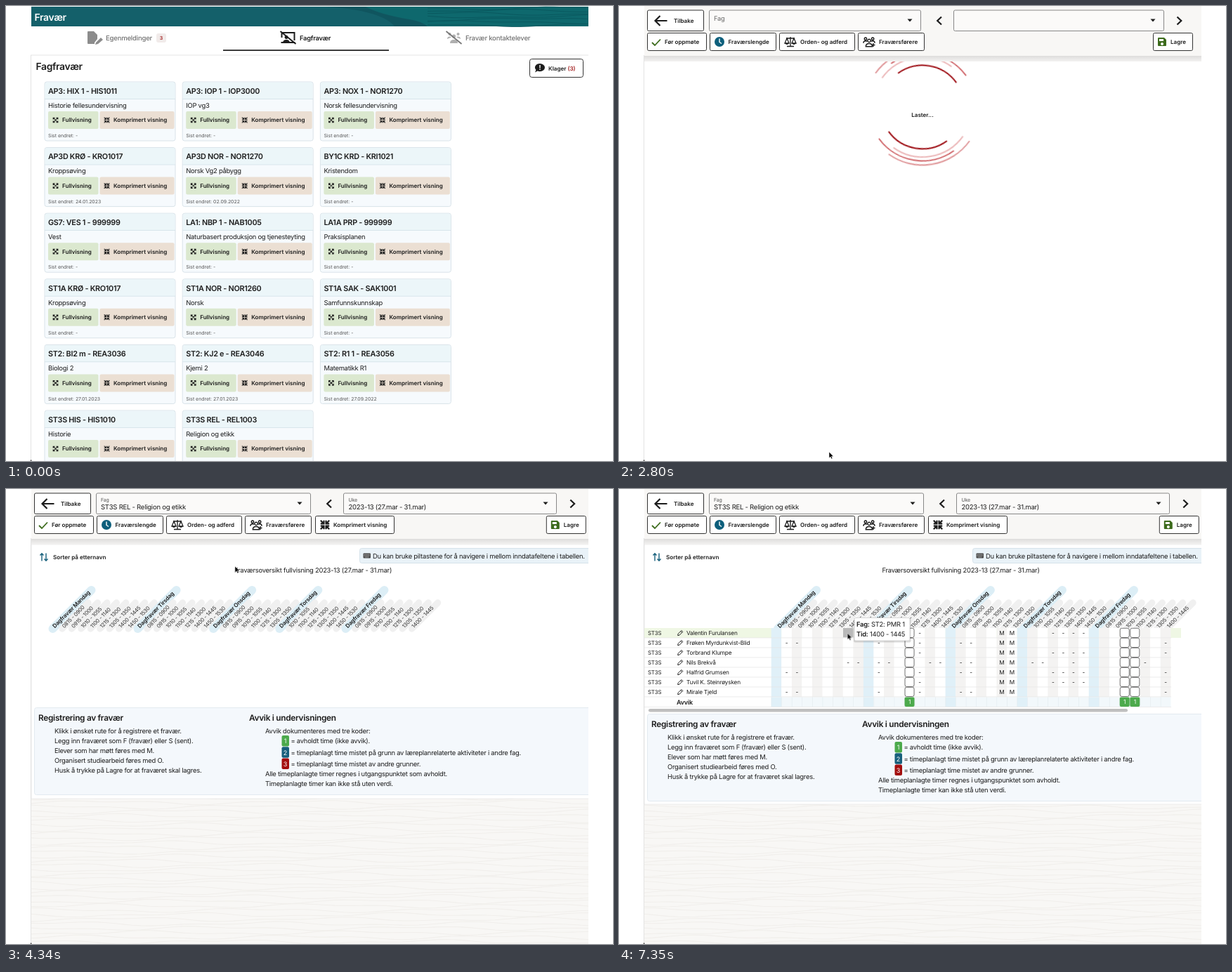
An HTML page that plays this animation: 864x648 px, repeating every 8 s.

```html
<!DOCTYPE html>
<html lang="no">
<head>
<meta charset="utf-8">
<title>Fravær</title>
<style>
html, body { margin: 0; width: 100%; height: 100%; overflow: hidden; background: #fff; }
svg { display: block; width: 100vw; height: 100vh; }
text { font-family: Inter, "Noto Sans", sans-serif; letter-spacing: -.025em; fill: #1c1c1c; white-space: pre; text-rendering: geometricPrecision; }
.b { font-weight: 600; }
.btn { font-weight: 600; letter-spacing: 0; }
.line { fill: none; stroke: #1c1c1c; }

.step { animation: 8s step-end infinite; }
.list { animation-name: list; }
.hover { animation-name: hover; }
.loader { animation-name: loader; }
.empty { animation-name: empty; }
.values { animation-name: values; }
.sheet { animation-name: sheet; }
.sparse { animation-name: sparse; }
.full { animation-name: full; }
.row { animation-name: row; }
.tip { animation-name: tip; }
.arrow { animation-name: arrow; }
@keyframes list { 0% { visibility: visible } 35%, 100% { visibility: hidden } }
@keyframes hover { 0% { visibility: hidden } 25.375% { visibility: visible } 35%, 100% { visibility: hidden } }
@keyframes loader { 0% { visibility: hidden } 35% { visibility: visible } 53.375%, 100% { visibility: hidden } }
@keyframes empty { 0% { visibility: hidden } 35% { visibility: visible } 40%, 100% { visibility: hidden } }
@keyframes values { 0% { visibility: hidden } 40% { visibility: visible } 53.375%, 100% { visibility: hidden } }
@keyframes sheet { 0% { visibility: hidden } 53.375%, 100% { visibility: visible } }
@keyframes sparse { 0% { visibility: hidden } 53.375% { visibility: visible } 55.125%, 100% { visibility: hidden } }
@keyframes full { 0% { visibility: hidden } 55.125%, 100% { visibility: visible } }
@keyframes row { 0% { visibility: hidden } 69.125%, 100% { visibility: visible } }
@keyframes tip { 0% { visibility: hidden } 81.375%, 100% { visibility: visible } }
@keyframes arrow { 0% { visibility: hidden } 35%, 100% { visibility: visible } }

.tint { animation: tint 8s linear infinite; }
@keyframes tint { 0%, 10.5% { opacity: 0 } 25.375%, 100% { opacity: 1 } }
.spin { animation: spin 8s linear infinite; }
@keyframes spin { 0%, 35% { transform: rotate(9deg) } 55%, 100% { transform: rotate(378.5deg) } }
.hand { animation: hand 8s linear infinite; }
@keyframes hand {
  0%, 21% { transform: translate(316px, 660px) }
  25.375%, 34.999% { transform: translate(298.5px, 635.5px) }
  35%, 100% { transform: translate(298px, 700px) }
}
.move { animation: move 8s ease-in-out infinite; }
@keyframes move {
  0%, 35% { transform: translate(299px, 635px) }
  44%, 45.5% { transform: translate(325px, 113px) }
  54.25%, 60.4% { transform: translate(326px, 110px) }
  70.875%, 71.75% { transform: translate(340px, 205.5px) }
  73.5%, 100% { transform: translate(325.3px, 205.5px) }
}
</style>
</head>
<body>
<script>
const range = (n, f) => Array.from({ length: n }, (_, i) => f(i)).join('');
const text = (x, y, s, size = 9.4, o = '') =>
  `<text x="${x}" y="${(y + size * .36).toFixed(2)}" font-size="${size}" ${o}>${s}</text>`;
const bold = (x, y, s, size, o = '') => text(x, y, s, size, 'class="b" ' + o);
const label = (x, y, s, o = '') => text(x, y, s, 8.05, 'class="btn" ' + o);
const box = (x, y, w, h, fill, stroke = 'none', r = 0, o = '') =>
  `<rect x="${x}" y="${y}" width="${w}" height="${h}" rx="${r}" fill="${fill}" stroke="${stroke}" ${o}/>`;
const line = (x, y, d, width = 1.2, scale = 1, o = '') =>
  `<path class="line" transform="translate(${x} ${y}) scale(${scale})" d="${d}" stroke-width="${width}" ${o}/>`;
const solid = (x, y, d, fill = '#1c1c1c', o = '') =>
  `<path transform="translate(${x} ${y})" d="${d}" fill="${fill}" ${o}/>`;
const group = (cls, s, o = '') => `<g class="${cls}" ${o}>${s}</g>`;
const shift = (x, y, s) => `<g transform="translate(${x} ${y})">${s}</g>`;
const wave = (x0, x1, y, amp, k) => {
  let d = '';
  for (let x = x0; x <= x1; x += 12)
    d += (d ? 'L' : 'M') + x + ' ' + (y + amp * (Math.sin(x / 47 + k * 1.9) + .6 * Math.sin(x / 21 + k * k))).toFixed(1);
  return d;
};

const EXPAND = 'M-3.5-1V-3.5H-1M1 3.5H3.5V1M1-3.5H3.5V-1M-1 3.5H-3.5V1M-3.5-3.5L3.5 3.5M3.5-3.5L-3.5 3.5';
const COMPRESS = 'M-1-4V-1H-4M1-4V-1H4M-1 4V1H-4M1 4V1H4M-1-1L-4-4M1-1L4-4M-1 1L-4 4M1 1L4 4';
const PEOPLE = 'M-6-7a2 2 0 1 0 .1 0zM6-7a2 2 0 1 0 .1 0zM0-4.5a2.6 2.6 0 1 0 .1 0zM-9.5 2q0-3.5 3.5-3.5q1.6 0 2.4 1M9.5 2q0-3.5-3.5-3.5q-1.6 0-2.4 1M-5.5 8q0-5 5.5-5t5.5 5z';

// Subject list
const cards = [
  ['AP3: HIX 1 - HIS1011', 'Historie fellesundervisning', '-'],
  ['AP3: IOP 1 - IOP3000', 'IOP vg3', '-'],
  ['AP3: NOX 1 - NOR1270', 'Norsk fellesundervisning', '-'],
  ['AP3D KRØ - KRO1017', 'Kroppsøving', '24.01.2023'],
  ['AP3D NOR - NOR1270', 'Norsk Vg2 påbygg', '02.09.2022'],
  ['BY1C KRD - KRI1021', 'Kristendom', '-'],
  ['GS7: VES 1 - 999999', 'Vest', '-'],
  ['LA1: NBP 1 - NAB1005', 'Naturbasert produksjon og tjenesteyting', '-'],
  ['LA1A PRP - 999999', 'Praksisplanen', '-'],
  ['ST1A KRØ - KRO1017', 'Kroppsøving', '-'],
  ['ST1A NOR - NOR1260', 'Norsk', '-'],
  ['ST1A SAK - SAK1001', 'Samfunnskunnskap', '-'],
  ['ST2: BI2 m - REA3036', 'Biologi 2', '27.01.2023'],
  ['ST2: KJ2 e - REA3046', 'Kjemi 2', '27.01.2023'],
  ['ST2: R1 1 - REA3056', 'Matematikk R1', '27.09.2022'],
  ['ST3S HIS - HIS1010', 'Historie', '-'],
  ['ST3S REL - REL1003', 'Religion og etikk', '-'],
];
const fullButton = fill => box(5, 42, 71.5, 25, fill, 'none', 2) + line(15.5, 54.5, EXPAND, 1.1, .95) + label(25, 54.5, 'Fullvisning');
const card = ([title, subject, date], i) => shift(55 + i % 3 * 196.2, 108 + Math.floor(i / 3) * 93.6,
  box(0, 0, 186, 84, '#f6fafd', '#d9e3e9', 3) +
  box(.5, .5, 185, 24, '#ecf6f9', 'none', 3) + box(0, 24, 186, .8, '#d3e2e8') +
  bold(5, 13, title, 10.8) + text(5, 33.5, subject) +
  fullButton('#dbe8cf') + box(78.5, 42, 106, 25, '#ebdfd3', 'none', 2) +
  line(88.5, 54.5, COMPRESS, 1.2, .95) + label(98, 54.5, 'Komprimert visning') +
  text(5, 76.8, 'Sist endret: ' + date, 6.9, 'style="fill:#555;letter-spacing:0"'));

const list =
  box(36, 1, 793, 28, '#14606a') +
  solid(0, 0, 'M455 1Q535 6 553 29H829V1Z', '#10555f') +
  solid(0, 0, 'M512 1Q532 12 574 19Q592 22 600 29H829V1Z', '#0e686d') +
  range(7, k => `<path d="${wave(600, 829, 3 + k * 4, 1.6, k)}" fill="none" stroke="#0a575e" stroke-width=".9"/>`) +
  bold(40.5, 15.5, 'Fravær', 13.9, 'style="fill:#fff"') +
  solid(116, 36, 'M1 0H9L14 5V11L10 16V18H1Q0 18 0 17V1Q0 0 1 0zM12 16L19 9L22 12L15 18L11 19z', '#8c8c8c') +
  text(142, 45.5, 'Egenmeldinger', 9.6, 'font-weight="500" style="fill:#737373"') +
  box(214, 39, 14, 13, '#f1ebea', 'none', 3) + bold(221, 45.8, '3', 7, 'text-anchor="middle" style="fill:#a01818"') +
  line(401.5, 45, 'M-9 0V-7H9V4M-10 7H10M-11-9L11 9', 2) +
  solid(399, 47, 'M0-5a2.5 2.5 0 1 0 .1 0zM-5 6q0-5 5-5t5 5z') +
  bold(418, 45.5, 'Fagfravær', 9.3) + box(309, 62.2, 236, 1.7, '#1c1c1c') +
  solid(637.5, 45, PEOPLE, '#b0b0b0') + line(637.5, 45, 'M-11-9L11 9', 1.8, 1, 'style="stroke:#777"') +
  text(654, 45.5, 'Fravær kontaktelever', 9.6, 'font-weight="500" style="fill:#737373"') +
  box(36, 70, 793, 578, '#f9f8f6', 'none', 0, 'class="tint"') +
  box(35, 69.6, 794, .8, '#dedede') +
  bold(42.5, 85.5, 'Fagfravær', 13.9) +
  box(745.5, 75.5, 76, 26, '#fff', '#333', 3) +
  solid(760, 88, 'M0-6a7 5.6 0 0 1 0 11.2q-2 0-3.5-.6L-7 6.5L-5.6 3A7 5.6 0 0 1 0-6z') +
  line(760, 88, 'M0-4V.4M0 1.6V3', 1.4, 1, 'style="stroke:#fff"') +
  label(772, 89, 'Klager <tspan style="fill:#a01818">(3)</tspan>') +
  cards.map(card).join('') +
  group('step hover', shift(251.2, 576, box(-.3, -.3, 186.6, 84, 'none', '#b9c6cd', 3) + fullButton('#c7d6c3')));

// Toolbar shared by loading view and sheet; dx follows the widened layout
const button = (x, w, tx, s) => box(x + .5, 38.5, w - 1, 25, '#fff', '#333', 2) + label(tx, 51.5, s);
const select = (x, w) => box(x + .5, 6, w - 1, 29.5, '#fbfaf9', '#888', 2) + solid(x + w - 16, 20.5, 'M-3.5-2H3.5L0 2z');
const toolbar = dx =>
  box(36, 0, 793, 71, '#f8f7f5') + box(36, 71, 793, 8, 'url(#shade)') +
  box(40.5, 6, 80, 29.5, '#fff', '#333', 2) + line(59.5, 21, 'M9 0H-8M-1-7L-8 0L-1 7', 2.2) + label(78, 21, 'Tilbake') +
  select(128, 302 + dx) + select(476 + dx, 300 + dx) +
  line(456 + dx, 21, 'M3-5.5L-2.8 0L3 5.5', 2.2) + line(797.5 + dx * 2.2, 21, 'M-3-5.5L2.8 0L-3 5.5', 2.2) +
  button(40, 85, 65, 'Før oppmøte') + line(53, 51.5, 'M-6 .5L-2 4.5L6-4', 1.8, 1, 'style="stroke:#3c6b1c"') +
  button(129, 95, 155.5, 'Fraværslengde') + `<circle cx="143" cy="51" r="7" fill="#0d5f7c"/>` +
  line(143, 51, 'M0-4.5V.5L3 2.5', 1.4, 1, 'style="stroke:#fff"') +
  button(228, 108, 258, 'Orden- og adferd') +
  line(244, 51, 'M0-7V6.5M-5 6.5H5M-6-5H6M-5-5L-8 2H-2zM5-5L2 2H8z', 1.3) + solid(244, 51, 'M-8 2H-2Q-5 6-8 2zM2 2H8Q5 6 2 2z') +
  button(340, 95, 370, 'Fraværsførere') + line(356, 51, PEOPLE, 1.7, .85) + line(362, 55.5, 'M-2.5 0H2.5M0-2.5V2.5', 1.4) +
  button(760 + dx * 2.2, 57, 785 + dx * 2.2, 'Lagre') +
  solid(773 + dx * 2.2, 51, 'M-6-5Q-6-6-5-6H3L6-3V5Q6 6 5 6H-5Q-6 6-6 5z', '#3c6b1c') +
  solid(773 + dx * 2.2, 51, 'M-4-4H2V-1H-4zM0 1a2 2 0 1 0 .1 0z', '#fff');
const values = dx =>
  text(135, 15.5, 'Fag', 7, 'style="fill:#555"') + text(135, 25.5, 'ST3S REL - Religion og etikk', 9.5) +
  text(483.5 + dx, 15.5, 'Uke', 7, 'style="fill:#555"') + text(483.5 + dx, 25.5, '2023-13 (27.mar - 31.mar)', 9.5);

const ring = (r, color) =>
  `<circle r="${r}" pathLength="4" stroke-dasharray="1" transform="rotate(45)" fill="none" stroke="${color}" stroke-width="2"/>`;
const loader =
  box(36, 79, 793, 569, '#fff') +
  shift(432, 144, group('spin', ring(59.5, '#9f1218') + ring(76.5, '#cf6468')) +
    `<g transform="scale(-1 1)">${group('spin', ring(71, '#ecb9ba') + ring(82.5, '#e09a9c'))}</g>`) +
  label(432, 155.5, 'Laster...', 'text-anchor="middle"') + toolbar(0) +
  group('step empty', text(135, 18, 'Fag', 9.2, 'style="fill:#666"')) + group('step values', values(0));

// Attendance sheet
const slots = ['0815 - 0900', '0915 - 1000', '1010 - 1055', '1100 - 1140', '1215 - 1300', '1305 - 1350', '1400 - 1445', '1450 - 1530'];
const week = { Mandag: '01234567', Tirsdag: '0123467', Onsdag: '012345', Torsdag: '234567', Fredag: '0123456' };
let hours = 0;
const columns = Object.entries(week).flatMap(([day, ids]) => [
  { name: 'Dagfravær ' + day, day: true, fill: '#e0f0f8' },
  ...[...ids].map(i => ({ name: slots[i], fill: ++hours % 2 ? '#fff' : '#f4f3f2' })),
]);
const headings = (x0, pitch) => {
  const pills = columns.map(({ day }, i) => {
    const x = x0 + i * pitch, n = day ? 55 : 37;
    return `<path d="M${x + 2} 199l${n}-${n}" stroke="${day ? '#dceef6' : '#f0f0f0'}" stroke-width="${day ? 12 : 9.3}" stroke-linecap="round"/>`;
  });
  const names = columns.map(({ name, day }, i) =>
    `<g transform="translate(${x0 + i * pitch + 3} 196.5) rotate(-45)">${day ? bold(0, 0, name, 8) : text(0, 0, name, 7.55, 'style="fill:#333"')}</g>`);
  return pills.join('') + names.join('');
};

const code = (x, y, n, fill) => box(x - 5, y - 8, 10.5, 15.5, fill, 'none', 2) +
  text(x, y, n, 9, 'text-anchor="middle" style="fill:#fff"');
const help =
  box(40.5, 311.5, 800, 124, '#f4f8fc', '#e3eaf0', 3) +
  bold(46, 325.5, 'Registrering av fravær', 11.85) +
  ['Klikk i ønsket rute for å registrere et fravær.', 'Legg inn fraværet som F (fravær) eller S (sent).',
    'Elever som har møtt føres med M.', 'Organisert studiearbeid føres med O.',
    'Husk å trykke på Lagre for at fraværet skal lagres.'].map((s, i) => text(69, 344.5 + i * 14.05, s)).join('') +
  bold(346, 325.5, 'Avvik i undervisningen', 11.85) +
  text(369, 344.5, 'Avvik dokumenteres med tre koder:') +
  code(397.5, 359, 1, '#4caa4c') + text(405.5, 359, '= avholdt time (ikke avvik).') +
  code(397.5, 375.3, 2, '#17607c') + text(405.5, 375.3, '= timeplanlagt time mistet på grunn av læreplanrelaterte aktiviteter i andre fag.') +
  code(397.5, 391.6, 3, '#a30e0e') + text(405.5, 391.6, '= timeplanlagt time mistet av andre grunner.') +
  text(369, 405.7, 'Alle timeplanlagte timer regnes i utgangspunktet som avholdt.') +
  text(369, 419.8, 'Timeplanlagte timer kan ikke stå uten verdi.');

const X0 = 224, PITCH = 14.58, TOP = 198, ROW = 14;
const colX = i => X0 + i * PITCH;
const pupils = ['Valentin Furulansen', 'Frøken Myrdunkvist-Blid', 'Torbrand Klumpe', 'Nils Brekvå', 'Halfrid Grumsen', 'Tuvil K. Steinrøysken', 'Mirale Tjeld'];
const early = [1, 2, 10, 14, 18, 19], late = [27, 28, 29, 30];
const dashes = [[14, ...late], [...early, 38], [14, ...late, 38], [7, 8, 10, 11, 15, 16, 18, 19, 25, 26, 29, 36],
  [...early, ...late, 38], [14, ...late, 38], [...early, 38]];
const input = [13, 34, 35];
const mark = (i, y, s) => text(colX(i), y, s, 8.2, 'text-anchor="middle"');
const cells = columns.map(({ day, fill }, i) => {
  const x = colX(i) - PITCH / 2;
  return box(x, TOP, PITCH + .1, ROW * 7, fill) +
    box(x, 296.4, PITCH + .1, 13.6, day ? fill : '#f2f8fb') + box(x, 296.4, .6, 13.6, '#e1eaee');
}).join('');
const pupilRow = (name, r) => {
  const y = TOP + 7.3 + r * ROW;
  return box(36, TOP + (r + 1) * ROW - .4, 750, .7, '#e4e4e4') +
    text(41, y, 'ST3S', 7.9) + line(87, y, 'M-3.5 3.5L-3 1L2-4L4-2L-1 3zM.8-2.8L2.8-.8', 1, .95) + text(96, y, name, 8.25) +
    dashes[r].map(i => mark(i, y, '-')).join('') + mark(22, y, 'M') + mark(23, y, 'M') +
    input.map(i => box(colX(i) - 6.5, TOP + r * ROW + .3, 13, 13.2, '#fff', '#555', 2.5, 'stroke-width=".8"')).join('');
};
const table =
  headings(X0, PITCH) +
  group('step row', box(36, TOP, 764, ROW, '#eff7e4')) + cells +
  group('step tip', box(319, TOP, 14.6, ROW - .5, '#b9b9b9')) +
  pupils.map(pupilRow).join('') +
  box(36, 310, 750, .7, '#e4e4e4') + bold(82, 303.3, 'Avvik', 9) +
  input.map(i => box(colX(i) - 7, 296.5, 14, 13.5, '#4caa4c', 'none', 2) +
    text(colX(i), 303.3, 1, 8.5, 'text-anchor="middle" style="fill:#fff"')).join('') +
  box(42, 313, 682, 4.4, '#bfbfbf', 'none', 2.2);
const tooltip =
  box(334, 184, 81.5, 34.5, '#000', 'none', 2, 'fill-opacity=".14"') + box(335, 183.5, 79, 32.5, '#fff', '#ccc', 2, 'stroke-width=".7"') +
  text(338, 192.3, '<tspan class="b">Fag:</tspan> ST2: PMR 1', 9.4) + text(338, 206.3, '<tspan class="b">Tid:</tspan> 1400 - 1445', 9.4);

const caption = x => text(x, 116, 'Fraværsoversikt fullvisning 2023-13 (27.mar - 31.mar)', 9.4, 'text-anchor="middle"');
const panel = bottom => box(36, 79, 794, bottom - 79, '#fff', '#e6e6e6', 0, 'stroke-width=".7"');
const sheet =
  box(36, 71, 793, 577, '#f8f7f5') +
  range(34, k => `<path d="${wave(36, 840, 440 + k * 6.4, 2.1, k)}" fill="none" stroke="#f1efec" stroke-width="1.1"/>`) +
  group('step sparse', panel(441) + caption(437) + headings(64.5, 13.45) + help) +
  group('step full', panel(449) + caption(486.5) + table + shift(0, 9, help)) +
  toolbar(4) + values(4) +
  button(440, 113, 466, 'Komprimert visning') + line(454, 51, COMPRESS, 1.4, 1.55) +
  line(54, 97, 'M-3 5.5V-5M-5.5-2.5L-3-5.3L-.5-2.5M3-5.5V5M.5 2.5L3 5.3L5.5 2.5', 1.4, 1, 'style="stroke:#17607c"') +
  label(67, 97.3, 'Sorter på etternavn') +
  box(503.5, 84.5, 340, 21, '#e9f2f8', '#d6e2ea', 3) +
  box(508.5, 91.5, 10.5, 7, '#4a4a4a', 'none', 1) + line(513.7, 95, 'M-4-1.5H4M-4 .2H4M-2.5 2H2.5', .8, 1, 'stroke-dasharray="1 .8" style="stroke:#ddd"') +
  text(522, 95.3, 'Du kan bruke piltastene for å navigere i mellom inndatafeltene i tabellen.') +
  group('step tip', tooltip);

const hand = solid(0, 0, 'M.2 1Q1.2-.6 2.2 1V4.2L6 5Q7 5.3 6.8 6.5L6 10.4H1.6L-2 6.4Q-1.8 4.6 .2 6.2Z', '#fff', 'stroke="#111" stroke-width=".9"');
const arrow = solid(0, 0, 'M0 0V8.8L2 7L3.4 10L4.9 9.3L3.5 6.4H6.2Z', '#000', 'stroke="#fff" stroke-width=".5"');

document.body.innerHTML = `<svg viewBox="0 0 864 648">
  <defs>
    <clipPath id="page"><rect x="35" width="794" height="648"/></clipPath>
    <linearGradient id="shade" x2="0" y2="1"><stop stop-color="#dedddc"/><stop offset="1" stop-color="#f3f2f1"/></linearGradient>
  </defs>
  <g clip-path="url(#page)">
    ${group('step list', list)}${group('step loader', loader)}${group('step sheet', sheet)}
    ${box(35, 70, .8, 578, '#dcdcdc')}${box(35, 646.5, 1.2, 1.5, '#111')}
    ${group('hand', hand)}${group('step arrow', group('move', arrow))}
  </g>
</svg>`;
</script>
</body>
</html>
```
